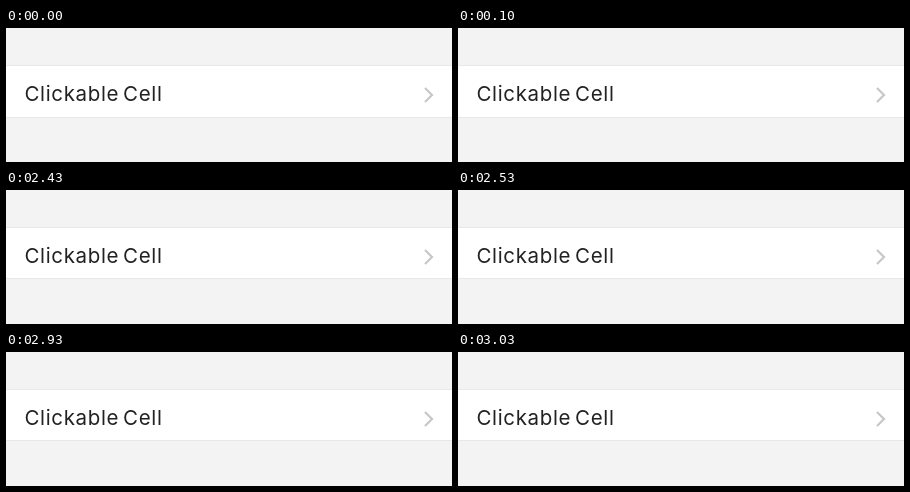
Animation of 446 by 134 pixels, one loop 3230 ms. Source, as an HTML page:

```html
<!DOCTYPE html>
<html lang="en">
<head>
<meta charset="utf-8">
<title>Clickable cell</title>
<style>
  html, body { margin: 0; width: 100%; height: 100%; overflow: hidden; background: #f3f3f3; }
  svg { display: block; width: 446px; height: 134px; }
  #row { fill: #fff; }
  .edge { fill: #e8e8e8; }
  text { font: 20.5px Inter, sans-serif; letter-spacing: .65px; word-spacing: -2.5px; fill: #222; }
  path { fill: none; stroke: #c7c7c9; stroke-width: 2.2; }
  .pressed #row { fill: #850f00; }
  .pressed .edge { fill: #c99490; }
  .pressed text { fill: #300500; }
  .pressed path { stroke: #d4bfc0; }
</style>
</head>
<body>
<svg id="stage" viewBox="0 0 446 134">
  <rect id="row" y="38" width="446" height="51"/>
  <rect class="edge" y="37" width="446" height="1"/>
  <rect class="edge" id="bottom" y="89" width="446" height="1"/>
  <text x="18.5" y="73">Clickable Cell</text>
  <path d="M419 60 L426 67 L419 74"/>
</svg>
<script>
  const LOOP = 3230, PRESS = 1430, RELEASE = 2430;
  const stage = document.getElementById('stage');
  const row = document.getElementById('row');
  const bottom = document.getElementById('bottom');
  const start = performance.now();

  function draw() {
    const t = (performance.now() - start) % LOOP;
    const released = t >= RELEASE;
    stage.classList.toggle('pressed', t >= PRESS && !released);
    // The lower hairline settles one pixel higher after release.
    row.setAttribute('height', released ? 50 : 51);
    bottom.setAttribute('y', released ? 88 : 89);
    requestAnimationFrame(draw);
  }
  draw();
</script>
</body>
</html>
```
